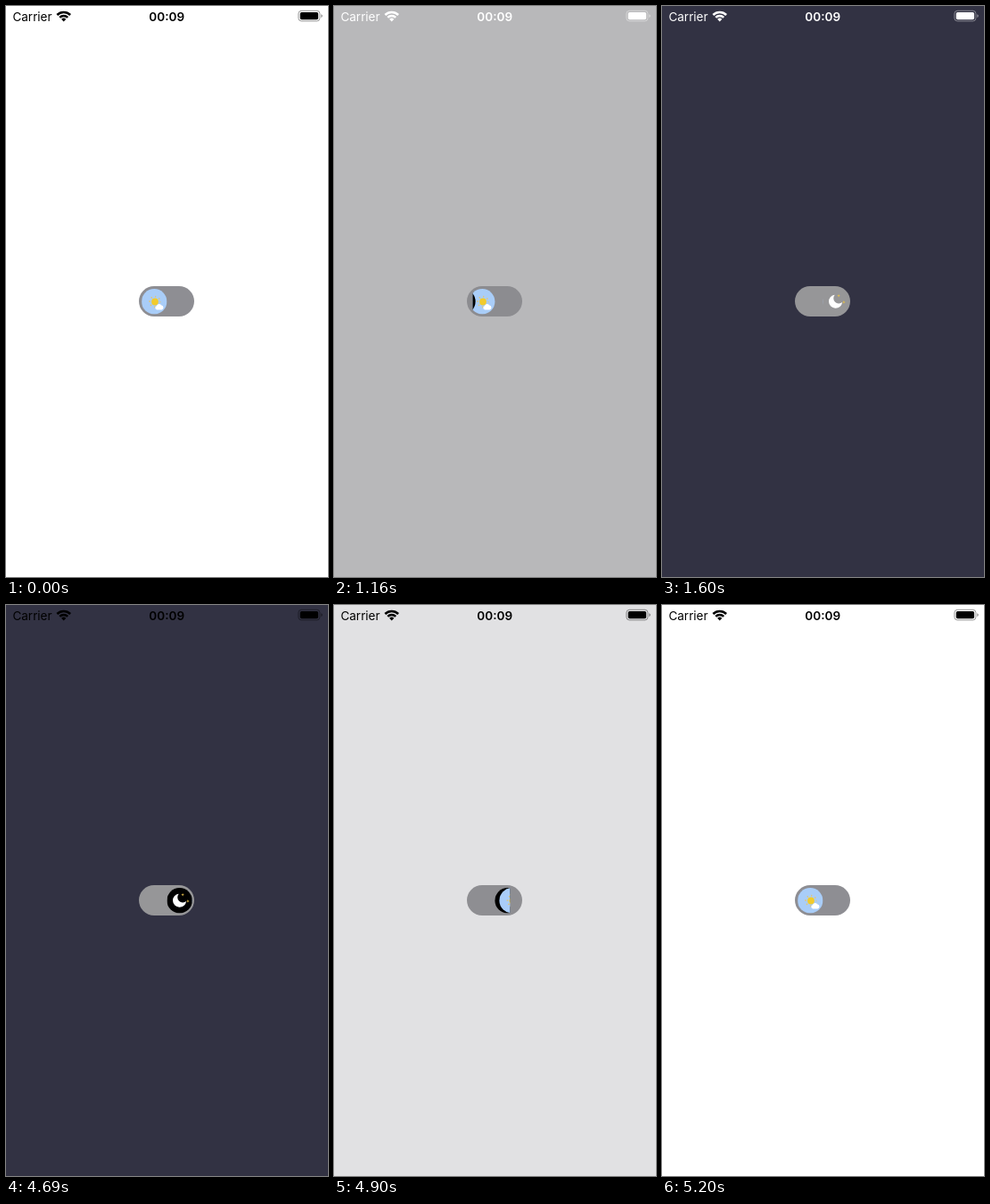
An HTML page that plays this animation: 361 px wide and 640 px high, repeating every 5.35 s.

```html
<!DOCTYPE html>
<html lang="en">
<head>
<meta charset="utf-8">
<title>Day and night switch</title>
<style>
  html, body { margin: 0; width: 100%; height: 100%; overflow: hidden; }

  /* --k: knob travel in px, --d: 1 towards night, -1 towards day */
  .stage {
    position: relative; width: 361px; height: 640px; overflow: hidden;
    --bg: #fff; --ink: #000; --track: #8e8e93; --disc: #000; --k: 0; --d: 1;
    background: var(--bg);
    animation: toggle 5350ms step-end infinite;
  }
  .stage svg { position: absolute; left: 0; top: 0; overflow: visible; }
  .status { fill: var(--ink); font: 13.5px Inter, Roboto, sans-serif; }
  .status .time { font-weight: 600; text-anchor: middle; }
  .waves { fill: none; stroke: var(--ink); stroke-width: 2.5; }
  .shell { fill: none; stroke: var(--ink); opacity: .4; }
  .cap { opacity: .45; }
  .track {
    position: absolute; left: 149.3px; top: 314.4px;
    width: 62px; height: 33.8px; border-radius: 17px;
    background: var(--track); transform: translate(0, 0);
  }
  .knob {
    position: absolute; left: 152.2px; top: 317.1px; width: 56.8px; height: 28.4px;
    clip-path: inset(0 calc((28.4 - var(--k)) * 1px) 0 calc(var(--k) * 1px));
  }
  .face { position: absolute; left: 0; top: 0; width: 28.4px; height: 28.4px; }
  .sun {
    z-index: 1;
    transform: translateX(calc((var(--k) - var(--d) * var(--k)) * 1px));
  }
  .moon {
    z-index: calc(1 + var(--d));
    transform: translateX(calc((var(--k) + var(--d) * (var(--k) - 28.4)) * 1px));
  }
  .disc { fill: var(--disc); }

  @keyframes toggle {
    0%      { --bg: #fff;    --ink: #000; --track: #8e8e93; --disc: #000; --k: 0;    --d: 1; }
    19.626% { --bg: #fefefe; --ink: #fff; --track: #8e8e93; --disc: #000; --k: 0;    --d: 1; }
    21.682% { --bg: #b8b8ba; --ink: #fff; --track: #8c8c90; --disc: #000; --k: 3.3;  --d: 1; }
    23.925% { --bg: #424250; --ink: #fff; --track: #929295; --disc: #000; --k: 14.2; --d: 1; }
    25.794% { --bg: #323243; --ink: #fff; --track: #969698; --disc: transparent; --k: 24.5; --d: 1; }
    29.906% { --bg: #323243; --ink: #fff; --track: #969698; --disc: transparent; --k: 28.4; --d: 1; }
    87.663% { --bg: #323243; --ink: #000; --track: #969698; --disc: #000; --k: 28.4; --d: -1; }
    89.719% { --bg: #84848d; --ink: #000; --track: #929295; --disc: #000; --k: 25.1; --d: -1; }
    91.588% { --bg: #e1e1e3; --ink: #000; --track: #8e8e92; --disc: #000; --k: 16.7; --d: -1; }
    93.831% { --bg: #fff;    --ink: #000; --track: #8e8e93; --disc: #000; --k: 4;    --d: -1; }
    97.196%, 100% { --bg: #fff; --ink: #000; --track: #8e8e93; --disc: #000; --k: 0; --d: 1; }
  }
</style>
</head>
<body>
<div class="stage">
  <svg class="status" width="361" height="24">
    <text x="7.4" y="16.6">Carrier</text>
    <text class="time" x="180.2" y="16.6">00:09</text>
    <g transform="translate(64.7 17.4)">
      <path d="M0 0L-2.6 -2.7A3.8 3.8 0 0 1 2.6 -2.7Z"/>
      <g class="waves">
        <path d="M-4.5 -4.5A6.36 6.36 0 0 1 4.5 -4.5"/>
        <path d="M-7.4 -7.4A10.46 10.46 0 0 1 7.4 -7.4"/>
      </g>
    </g>
    <rect class="shell" x="327.9" y="5.3" width="24" height="11.6" rx="3.4"/>
    <rect x="329.7" y="7" width="20.4" height="8.2" rx="1.8"/>
    <path class="cap" d="M353.3 9.2Q354.8 9.7 354.8 11.1T353.3 13Z"/>
  </svg>

  <div class="track"></div>
  <div class="knob">
    <div class="face sun">
      <svg width="28.4" height="28.4" viewBox="-14.2 -14.2 28.4 28.4">
        <circle r="14.2" fill="#a9cdf8"/>
        <g transform="translate(.8 .3)">
          <circle r="5.9" fill="none" stroke="#e3c672" stroke-width="1.7"
            stroke-dasharray="1.3 3.334" stroke-dashoffset=".65"/>
          <circle r="3.9" fill="#f2cb2c"/>
        </g>
        <path fill="#fff" d="M3 9.2A2.1 2.1 0 0 1 2.6 5.1A3 3 0 0 1 8.2 4.4A2.45 2.45 0 0 1 8.4 9.2Z"/>
      </svg>
    </div>
    <div class="face moon">
      <svg width="28.4" height="28.4" viewBox="-14.2 -14.2 28.4 28.4">
        <circle class="disc" r="14.2"/>
        <path fill="#fff" d="M-.91 -7.55A7.6 7.6 0 1 0 7.55 .91A6 6 0 0 1 -.91 -7.55Z"/>
        <g fill="#e8c04a">
          <path d="M3.5 -8.3L4 -7L5.3 -6.5L4 -6L3.5 -4.7L3 -6L1.7 -6.5L3 -7Z"/>
          <path d="M9.3 -1.1L9.8 .2L11.1 .7L9.8 1.2L9.3 2.5L8.8 1.2L7.5 .7L8.8 .2Z"/>
        </g>
      </svg>
    </div>
  </div>
</div>
</body>
</html>
```
